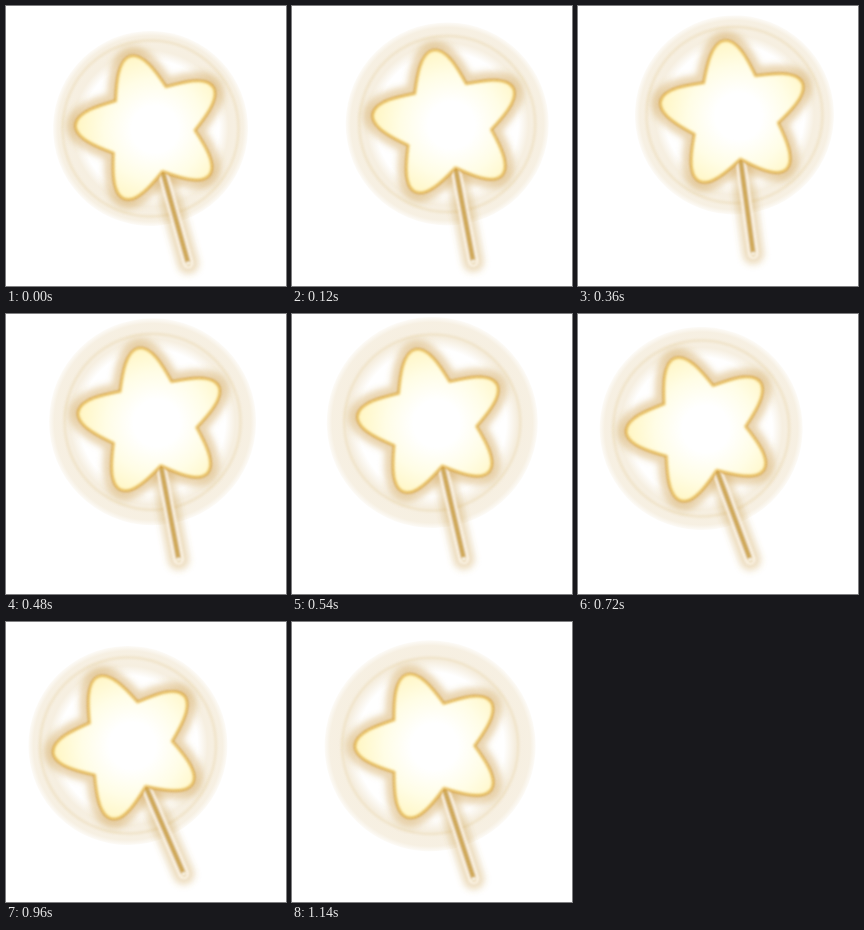
These frames come from a looping animation (280x280 px, 1200 ms). An HTML page:

```html
<!DOCTYPE html>
<html lang="en">
<head>
<meta charset="utf-8">
<title>Star wand</title>
<style>
  html, body { margin: 0; width: 100%; height: 100%; overflow: hidden; background: #fff; }
  svg { display: block; width: 100vw; height: 100vh; }
</style>
</head>
<body>
<svg viewBox="0 0 280 280">
  <defs>
    <radialGradient id="haloFill">
      <stop offset=".7" stop-color="#c79a40" stop-opacity="0"/>
      <stop offset=".8" stop-color="#c79a40" stop-opacity=".16"/>
      <stop offset=".95" stop-color="#c79a40" stop-opacity=".15"/>
      <stop offset="1" stop-color="#c79a40" stop-opacity=".04"/>
    </radialGradient>
    <radialGradient id="starFill" gradientUnits="userSpaceOnUse" cx="4" cy="2" r="78">
      <stop offset=".3" stop-color="#fff"/>
      <stop offset=".65" stop-color="#fffde6"/>
      <stop offset="1" stop-color="#fff6c4"/>
    </radialGradient>
    <filter id="soft" filterUnits="userSpaceOnUse" x="-130" y="-130" width="260" height="300">
      <feGaussianBlur stdDeviation="3"/>
    </filter>
    <filter id="fine" filterUnits="userSpaceOnUse" x="-130" y="-130" width="260" height="300">
      <feGaussianBlur stdDeviation=".9"/>
    </filter>
    <clipPath id="inside"><use href="#star"/></clipPath>
    <path id="star"/>
    <path id="stick" d="M0 46V140"/>
  </defs>
  <g id="wand" fill="none" stroke-linecap="round" stroke-linejoin="round">
    <circle id="halo" fill="url(#haloFill)"/>
    <circle r="88" stroke="#d0a548" stroke-width="2.5" opacity=".16" filter="url(#fine)"/>
    <g filter="url(#soft)" stroke="#cb9a3c">
      <use href="#star" stroke-width="17" opacity=".4"/>
      <use href="#stick" stroke-width="22" opacity=".32"/>
    </g>
    <g filter="url(#fine)">
      <use href="#stick" stroke="#fffaf0" stroke-width="10"/>
      <use href="#stick" stroke="#cfa95a" stroke-width="5.5"/>
      <path d="M-1 140H1" stroke="#fffdf5" stroke-width="3"/>
    </g>
    <use href="#star" fill="url(#starFill)"/>
    <g clip-path="url(#inside)">
      <use href="#star" stroke="#f8de90" stroke-width="5" opacity=".6" filter="url(#fine)"/>
    </g>
    <use href="#star" stroke="#d9a540" stroke-width="2.2" opacity=".85" filter="url(#fine)"/>
  </g>
</svg>
<script>
const LOOP = 1200, STEP = 60, TAU = Math.PI * 2;
const el = id => document.getElementById(id);

// One arm pointing up, repeated five times.
const ARM = [[-26.5, -36.4], [-22, -50], [-14, -75.5], [0, -75.5], [14, -75.5], [22, -50], [26.5, -36.4]];

function starPath() {
  let d = '';
  for (let i = 0; i < 5; i++) {
    const c = Math.cos(i * TAU / 5), s = Math.sin(i * TAU / 5);
    const p = ARM.map(([x, y]) => `${(x * c - y * s).toFixed(2)} ${(x * s + y * c).toFixed(2)}`);
    d += `${i ? 'L' : 'M'}${p[0]}C${p.slice(1).join(' ')}`;
  }
  return d + 'Z';
}

const wave = (turn, deg) => Math.sin(TAU * (turn + deg / 360));

function draw(now) {
  const n = Math.floor((now % LOOP) / STEP);
  const turn = n * STEP / LOOP;
  const x = 139.2 + 20.6 * wave(turn, 15);
  const y = 116.2 + 8.4 * wave(turn, 132);
  const tilt = -15.6 + 8.3 * wave(turn, 0);
  el('wand').setAttribute('transform', `translate(${x} ${y}) rotate(${tilt})`);
  el('halo').setAttribute('r', 97.5 + 2 * (n % 5));
}

el('star').setAttribute('d', starPath());
const start = performance.now();
function tick() {
  draw(performance.now() - start);
  requestAnimationFrame(tick);
}
tick();
</script>
</body>
</html>
```
